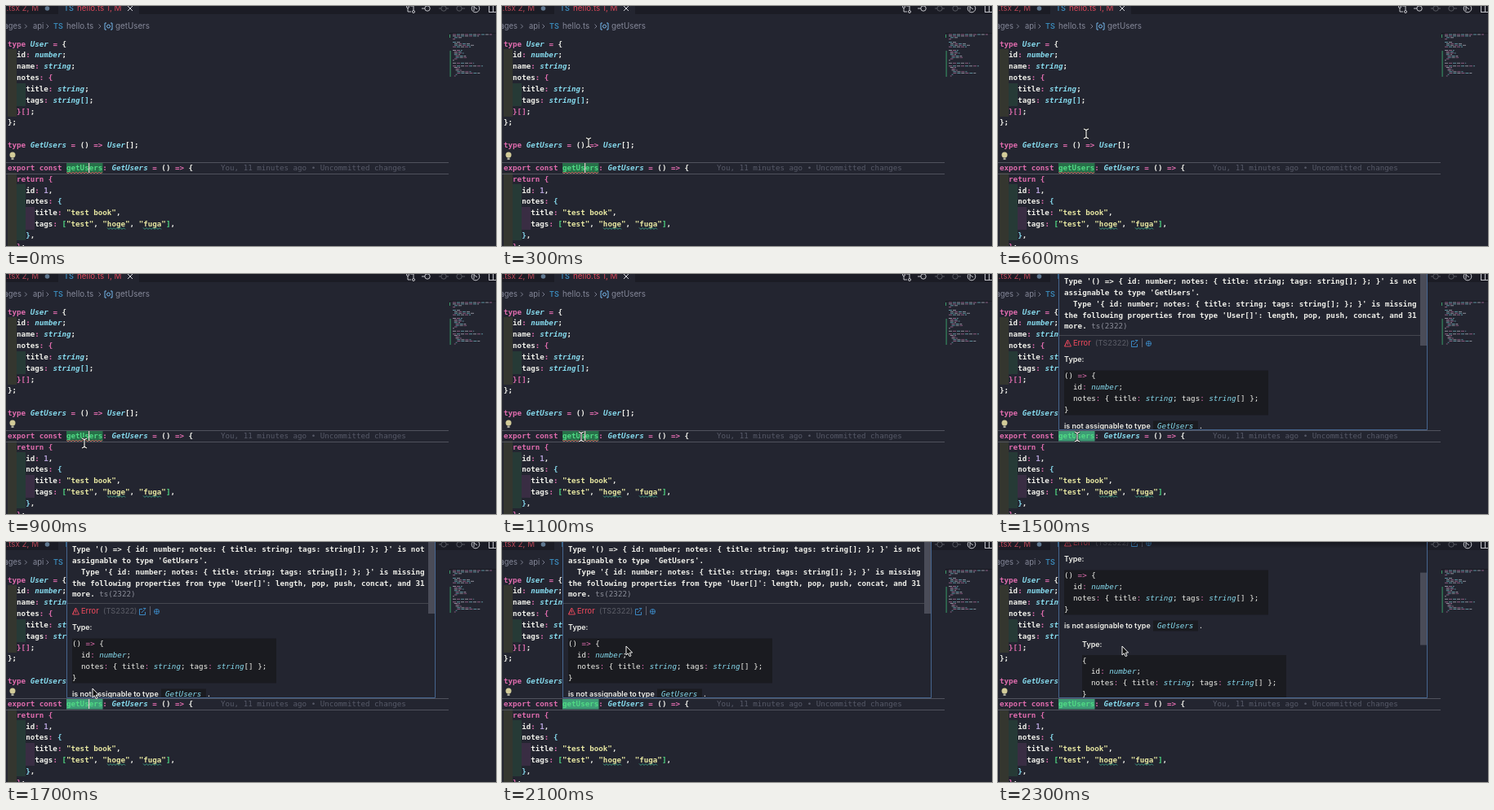
These frames come from a looping animation (600x295 px, 2.4 s). An HTML page with a canvas:

```html
<!DOCTYPE html>
<html lang="en">
<head>
<meta charset="utf-8">
<title>Editor hover</title>
<style>
html, body { margin: 0; width: 100%; height: 100%; overflow: hidden; background: #232530; }
canvas { display: block; }
</style>
</head>
<body>
<canvas id="stage" width="600" height="295"></canvas>
<script>
const g = document.getElementById('stage').getContext('2d');
const LOOP = 2400, STEP = 100, CH = 5.54, LINE = 13.84, TOP = 46.3;
const BG = '#232530', WHITE = '#f0f0ea', PINK = '#e06cae', CYAN = '#86dbee',
      GREEN = '#50da84', YELLOW = '#e8e8a2', PURPLE = '#b6a2da', GRAY = '#8b8d98', RED = '#dc4658';
const MONO = '"DejaVu Sans Mono", monospace', SANS = 'Inter, sans-serif';
const DEPTH = [WHITE, PINK, CYAN, GREEN];

const source = `type User = {
  id: number;
  name: string;
  notes: {
    title: string;
    tags: string[];
  }[];
};

type GetUsers = () => User[];

export const getUsers: GetUsers = () => {
  return {
    id: 1,
    notes: {
      title: "test book",
      tags: ["test", "hoge", "fuga"],
    },
  };`.split('\n');

const message = `Type '() => { id: number; notes: { title: string; tags: string[]; }; }' is not
assignable to type 'GetUsers'.
  Type '{ id: number; notes: { title: string; tags: string[]; }; }' is missing
the following properties from type 'User[]': length, pop, push, concat, and 31
more.`.split('\n');

const body = ['  id: number;', '  notes: { title: string; tags: string[] };', '}'];

function rect(x, y, w, h, color) {
  g.fillStyle = color;
  g.fillRect(x, y, w, h);
}

function stroke(color, width, ...points) {
  g.strokeStyle = color;
  g.lineWidth = width;
  g.beginPath();
  points.forEach(([x, y]) => g.lineTo(x, y));
  g.stroke();
}

function circle(x, y, r, color, filled) {
  g.beginPath();
  g.arc(x, y, r, 0, 7);
  g.lineWidth = 1;
  g.fillStyle = g.strokeStyle = color;
  filled ? g.fill() : g.stroke();
}

// y is the middle of the line of text
function text(s, x, y, color, font, align = 'left') {
  g.font = font;
  g.textAlign = align;
  g.fillStyle = color;
  g.fillText(s, x, y + 3.3);
}

const mono = (s, x, y, color, style = '') => text(s, x, y, color, `${style} 9.2px ${MONO}`);
const sans = (s, x, y, color, size = 9.2, weight = 500, align) =>
  text(s, x, y, color, `${weight} ${size}px ${SANS}`, align);

function tokenColor(token) {
  if (/^(type|export|const|return|=>|=|:)$/.test(token)) return PINK;
  if (/^(User|GetUsers|number|string)$/.test(token)) return CYAN;
  if (token === 'getUsers') return GREEN;
  if (token[0] === '"') return YELLOW;
  return /^\d/.test(token) ? PURPLE : WHITE;
}

function codeLines(lines, x, y, pitch, weight, nested) {
  let depth = 0;
  lines.forEach((line, i) => {
    for (const m of line.matchAll(/"[^"]*"|\w+|=>|\S/g)) {
      const token = m[0];
      let color = tokenColor(token);
      if (nested && '}])'.includes(token)) depth--;
      if (nested && '{}[]()'.includes(token)) color = DEPTH[depth];
      if (nested && '{[('.includes(token)) depth++;
      const italic = color === CYAN && /\w/.test(token) ? 'italic ' : '';
      mono(token, x + m.index * CH, y + i * pitch, color, italic + weight);
    }
  });
}

function squiggle(x, y, w, color) {
  const points = [];
  for (let i = 0; i <= w; i += 2) points.push([x + i, y + (i / 2 % 2 ? 1 : -1)]);
  stroke(color, 0.9, ...points);
}

function tabs() {
  rect(0, 0, 600, 10, '#1b1c25');
  rect(64, 0, 99, 10, BG);
  sans('.tsx 2, M', 40, 3, '#b84656', 9.8, 400, 'right');
  circle(50.5, 3, 2.8, '#5f7890', true);
  sans('TS', 71, 3, '#3a88b8', 9, 600);
  sans('hello.ts 1, M', 87, 3, RED, 9.8, 400);
  stroke('#d5d6dc', 1, [149, 0], [155, 6]);
  stroke('#d5d6dc', 1, [155, 0], [149, 6]);

  const crumb = '#858899';
  sans('pages', 19, 25, crumb, 9.4, 400, 'right');
  sans('api', 33, 25, crumb, 9.4, 400);
  sans('TS', 58, 25, '#3a88b8', 9, 600);
  sans('hello.ts', 74, 25, crumb, 9.8, 400);
  sans('getUsers', 134, 25, crumb, 9.8, 400);
  for (const x of [23, 49.5, 113.5]) stroke(crumb, 0.9, [x, 22.5], [x + 2.5, 25], [x, 27.5]);
  for (const [x, d] of [[121, 2], [130, -2]])
    stroke('#75b5e8', 1, [x + d, 21], [x, 21], [x, 29], [x + d, 29]);
  circle(125.5, 25, 2, '#75b5e8');
}

function toolbar() {
  const on = '#c3c4ca', off = '#55575f';
  circle(492, 1, 1.5, on);
  circle(499, 7, 1.5, on);
  stroke(on, 1, [492, 2], [492, 7], [496, 7]);
  stroke(on, 1, [499, 5], [499, 0], [495, 0]);
  circle(516, 3, 3.2, on);
  stroke(on, 1, [513, 3], [509, 3]);
  circle(536, 3, 3.2, off);
  stroke(off, 1, [530, 3], [533, 3]);
  stroke(off, 1, [539, 3], [542, 3]);
  circle(555, 3, 3.2, off);
  stroke(off, 1, [558, 3], [562, 3]);
  circle(575, 3, 4.8, on);
  stroke(on, 1, [573, -1], [573, 6]);
  stroke(on, 1, [573, 1], [577, 4]);
  g.strokeRect(591.5, -2.5, 10, 10);
  stroke(on, 1, [596.5, 0], [596.5, 7]);
}

function minimap() {
  rect(543, 33, 57, 1, '#191a22');
  rect(543, 35, 1, 4, '#3c9a68');
  rect(543.5, 55, 1.2, 32, '#36885f');
  [[0, 48], [0, 32], [2, 10], [0, 3], [0, 0], [0, 10], [2, 19], [2, 24], [0, 22], [0, 0]]
    .forEach(([x, w], i) => miniLine(x, w, 34.5 + i * 1.9));
  source.forEach((line, i) => {
    const indent = line.search(/\S/);
    if (indent >= 0) miniLine(indent * 0.9, (line.length - indent) * 0.9, 54 + i * 1.75);
  });
}

function miniLine(x, w, y) {
  for (let i = 0; i < w; i += 5)
    rect(547 + x + i, y, Math.min(4, w - i), 1, ['#8a8c98', '#8a5c80', '#5d8f9c'][(i / 5 + Math.floor(y)) % 3]);
}

function editor(hovering, caret) {
  rect(2, 53, 11, 83, '#34362f');
  rect(13, 95, 11, 28, '#263a36');
  rect(2, 205, 11, 90, '#34362f');
  rect(13, 219, 11, 69, '#263a36');
  rect(24, 247, 11, 28, '#392d43');
  rect(0, 192, 542, 1, '#50525d');
  rect(0, 206, 542, 1, '#50525d');
  rect(74, 193, 44.5, 12.5, hovering ? '#3e9d76' : '#277049');
  codeLines(source, 2, TOP, LINE, 'bold', true);
  if (!hovering) squiggle(74, 205, 44, '#d0525a');
  squiggle(124, 273.5, 22, '#3ba58a');
  squiggle(168, 273.5, 22, '#3ba58a');
  mono('You, 11 minutes ago • Uncommitted changes', 263, 198.5, '#575a68');
  circle(8, 183, 3.5, '#d2cb98', true);
  rect(6.5, 186.5, 3, 2.5, '#a9a99c');
  if (caret) rect(101, 193, 1.2, 12, '#e6c5cc');
}

function codeBlock(first, x, y) {
  const lines = [...first, ...body];
  rect(x, y, 250, 55, '#1a1b20');
  codeLines(lines, x, y + 6.3, LINE, '', false);
}

function popup(scroll) {
  g.save();
  g.beginPath();
  g.rect(74, 0, 452, 192);
  g.clip();
  rect(74, 0, 452, 192, BG);
  g.translate(0, -scroll);
  message.forEach((line, i) => mono(line, 81, 8.5 + i * 13.9, WHITE, 'bold'));
  mono('ts(2322)', 81 + 6 * CH, 64, GRAY);
  rect(75, 75, 450, 1, '#44464f');

  stroke(RED, 1, [85.5, 81], [81.5, 89], [89.5, 89], [85.5, 81], [81.5, 89]);
  stroke(RED, 1, [85.5, 84], [85.5, 87]);
  sans('Error', 92, 85, RED);
  sans('(TS2322)', 119, 85, '#555761');
  const link = '#3b86c0';
  stroke(link, 1, [167, 82.5], [163.5, 82.5], [163.5, 89.5], [170.5, 89.5], [170.5, 86]);
  stroke(link, 1, [166, 87], [171, 81.5], [168, 81.5]);
  sans('|', 175, 85, '#676a75');
  circle(184.5, 85.5, 3, link);
  stroke(link, 0.8, [181, 85.5], [188, 85.5]);
  stroke(link, 0.8, [184.5, 82.5], [184.5, 89]);

  sans('Type:', 81, 105, WHITE, 9, 600);
  codeBlock(['() => {'], 81, 118.5);
  sans('is not assignable to type', 81, 186.3, WHITE, 9, 600);
  rect(190, 180.5, 55, 13, '#1a1b20');
  mono('GetUsers', 195, 187, CYAN, 'italic');
  sans('.', 247, 187, WHITE, 9, 600);
  sans('Type:', 103, 209.5, WHITE, 9, 600);
  codeBlock(['{'], 103, 223);
  g.translate(0, scroll);

  if (scroll) {
    const shade = g.createLinearGradient(0, 0, 0, 8);
    shade.addColorStop(0, 'rgba(15,16,22,.65)');
    shade.addColorStop(1, 'rgba(15,16,22,0)');
    rect(75, 0, 450, 8, shade);
  }
  rect(517, scroll * 0.46 - 1, 8, 89, '#4a4c58');
  stroke('#46658f', 1, [74.5, 0], [74.5, 191.5], [525.5, 191.5], [525.5, 0]);
  g.restore();
}

function beam(x, y) {
  for (const [color, w] of [['#111', 2.6], ['#f4f4f4', 1.2]]) {
    stroke(color, w, [x - 3, y - 6], [x, y - 4.5], [x + 3, y - 6]);
    stroke(color, w, [x, y - 5], [x, y + 5]);
    stroke(color, w, [x - 3, y + 6], [x, y + 4.5], [x + 3, y + 6]);
  }
}

function arrow(x, y) {
  g.beginPath();
  for (const [dx, dy] of [[0, 0], [0, 11], [2.4, 8.8], [4.2, 12.6], [6, 11.8], [4.3, 8.1], [7.6, 8]])
    g.lineTo(x + dx, y + dy);
  g.closePath();
  g.fillStyle = '#111';
  g.strokeStyle = '#f4f4f4';
  g.lineWidth = 1;
  g.fill();
  g.stroke();
}

// time, x, y of the pointer
const path = [[100, 102, 190], [400, 108, 157], [600, 108, 157], [900, 96, 208], [1100, 97, 200],
              [1500, 97, 200], [1700, 106, 180], [1800, 106, 180], [2100, 152, 128], [LOOP, 152, 128]];

function pointer(t) {
  const i = path.findIndex(p => p[0] > t);
  const [a, b] = [path[i - 1], path[i]];
  const k = (t - a[0]) / (b[0] - a[0]);
  return [a[1] + (b[1] - a[1]) * k, a[2] + (b[2] - a[2]) * k];
}

function draw(now) {
  const t = Math.floor(now % LOOP / STEP) * STEP;
  const hovering = t >= 1500;
  rect(0, 0, 600, 295, BG);
  tabs();
  toolbar();
  minimap();
  editor(hovering, t % 800 < 400);
  if (hovering) popup(84 * Math.min(1, Math.max(0, (t - 2100) / 200)));
  if (t >= 100) (t >= 1600 ? arrow : beam)(...pointer(t));
  requestAnimationFrame(draw);
}
requestAnimationFrame(draw);
</script>
</body>
</html>
```
